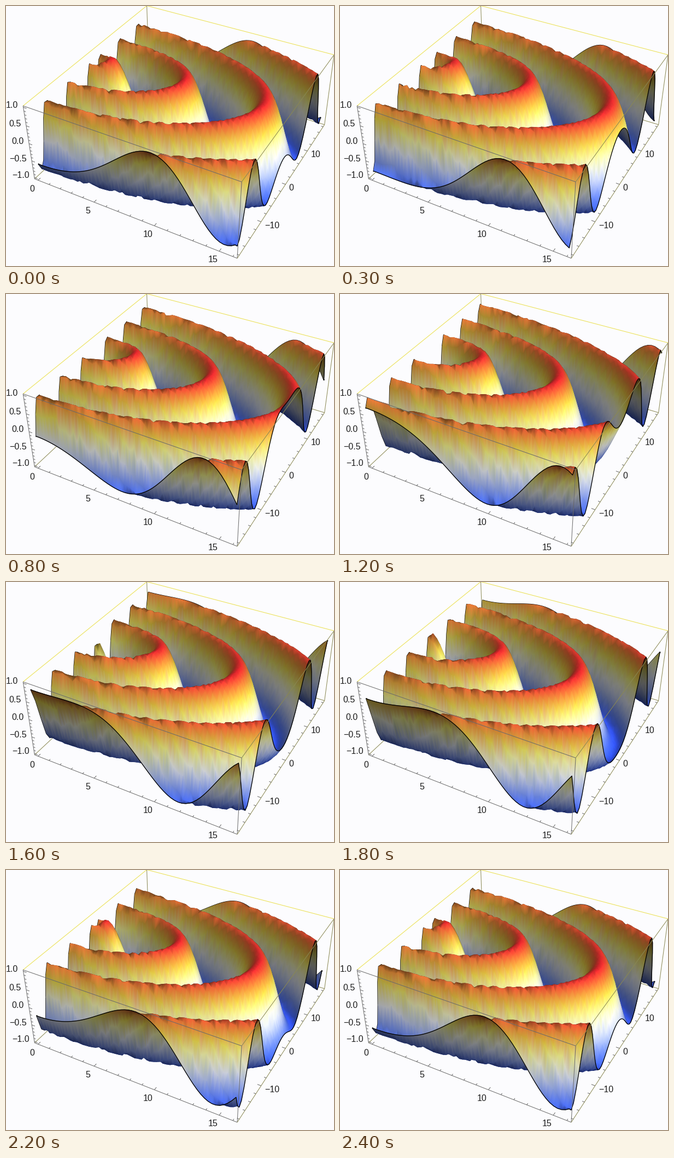
Animation, 600 px wide and 475 px high, one loop 2500 ms. Source, as a matplotlib script:

```python
import numpy as np
import matplotlib.pyplot as plt
from matplotlib.animation import FuncAnimation
from matplotlib.collections import LineCollection, TriMesh
from matplotlib.tri import Triangulation

W, H, DPI = 600, 475, 100
STEPS = 24                       # frames per wave period
XMAX, YMAX = 16, 18
PAD = 0.02                       # margin between data and box, each side
SCALE = np.array([1 / XMAX, 0.5 / YMAX, 0.2]) / (1 + 2 * PAD)

# Camera: looks at the box centre, box ratios 1 : 1 : 0.4
CAM = np.array([1.3, -2.4, 2.0])
FWD = -CAM / np.linalg.norm(CAM)
RIGHT = np.cross(FWD, [0, 0, 1])
RIGHT /= np.linalg.norm(RIGHT)
UP = np.cross(RIGHT, FWD)
ZOOM, CX, CY = 1367, 329.8, 201

LIGHTS = np.array([[1.5, -0.5, 1.5], [1.5, 1.5, 2.5], [-0.5, 1.5, 1.5]])
LIGHTS /= np.linalg.norm(LIGHTS, axis=1, keepdims=True)
LIGHTS = LIGHTS @ np.array([RIGHT, UP, -FWD])
AMBIENT, DIFFUSE = 0.33, 0.37

TEMPERATURE = np.array([
    [.179, .305, .934], [.309, .442, .941], [.453, .567, .950],
    [.642, .720, .965], [.820, .859, .977], [.936, .952, .994],
    [.984, .988, .912], [.995, .992, .728], [.993, .986, .481],
    [.956, .863, .283], [.904, .658, .242], [.858, .450, .204],
    [.817, .134, .164]])

PAPER, GREY, OLIVE, YELLOW = "#fcfcfe", "#6a6a6a", "#8a8852", "#ebe04c"


def to_box(x, y, z):
    pts = np.stack(np.broadcast_arrays(x, y, z), axis=-1) * SCALE
    return pts - [0.5 / (1 + 2 * PAD), 0, 0]


def project(p):
    d = np.asarray(p, float) - CAM
    k = ZOOM / (d @ FWD)
    return np.stack([CX + k * (d @ RIGHT), CY - k * (d @ UP)], axis=-1)


def px(width):
    return width * 72 / DPI


# Slightly irregular sampling mesh
NX, NY = 57, 52
rng = np.random.default_rng(4)
gx, gy = np.meshgrid(np.linspace(0, XMAX, NX), np.linspace(-YMAX, YMAX, NY),
                     indexing="ij")
shift = rng.uniform(-0.23, 0.23, (2, NX - 2, NY - 2))
gx[1:-1, 1:-1] += shift[0] * XMAX / (NX - 1)
gy[1:-1, 1:-1] += shift[1] * 2 * YMAX / (NY - 1)
radius = np.hypot(gx, gy)
swing = 1 - 0.16 * (gy / radius) ** 2     # weaker towards the sides

ids = np.arange(NX * NY).reshape(NX, NY)
a, b, c, d = (q.ravel() for q in
              (ids[:-1, :-1], ids[1:, :-1], ids[1:, 1:], ids[:-1, 1:]))
tris = np.concatenate([np.stack([a, b, d], 1), np.stack([b, c, d], 1)])
ground = to_box(gx, gy, 0).reshape(-1, 3)[:, :2]
dist = np.linalg.norm(ground[tris].mean(axis=1) - CAM[:2], axis=1)
tris = tris[np.argsort(-dist)]   # far triangles first


def shade(normal):
    return AMBIENT + DIFFUSE * np.clip(normal @ LIGHTS.T, 0, None).sum(-1)


def surface(phase):
    """Screen points of the mesh, and corner colours of every triangle."""
    z = swing * np.sin(radius - phase)
    xy = project(to_box(gx, gy, z))
    slope = swing * np.cos(radius - phase) / radius
    n = np.stack([-slope * gx * SCALE[2] / SCALE[0],
                  -slope * gy * SCALE[2] / SCALE[1],
                  np.ones_like(z)], axis=-1)
    n /= np.linalg.norm(n, axis=-1, keepdims=True)

    p, q, r = np.moveaxis(xy.reshape(-1, 2)[tris], 1, 0)
    u, v = q - p, r - p
    from_above = u[:, 0] * v[:, 1] - u[:, 1] * v[:, 0] < 0
    light = np.where(from_above[:, None], shade(n).ravel()[tris],
                     shade(-n).ravel()[tris])
    stops = np.linspace(-1, 1, len(TEMPERATURE))
    rgb = np.stack([np.interp(z, stops, ch) for ch in TEMPERATURE.T], axis=-1)
    rgb = rgb.reshape(-1, 3)[tris] * light[..., None]
    return xy, np.clip(rgb, 0, 1).reshape(-1, 3)


fig = plt.figure(figsize=(W / DPI, H / DPI), dpi=DPI, facecolor=PAPER)
ax = fig.add_axes([0, 0, 1, 1])
ax.set_xlim(0, W)
ax.set_ylim(H, 0)
ax.axis("off")


def segments(pairs, color, width, z):
    ax.add_collection(LineCollection([project(p) for p in pairs], colors=color,
                                     linewidths=px(width), zorder=z),
                      autolim=False)


def corner(name):
    return [0.5 if name[1] == "R" else -0.5,
            0.5 if name[0] == "B" else -0.5,
            0.2 if name[2] == "t" else -0.2]


def box_edges(names, color, z):
    pairs = [[corner(n) for n in pair.split("-")] for pair in names.split()]
    segments(pairs, color, 1, z)


box_edges("FLt-BLt BLt-BRt", YELLOW, 0)
box_edges("BLt-BLb FLb-BLb BLb-BRb", OLIVE, 0)
box_edges("FLt-FRt FRt-FRb FLt-FLb FLb-FRb", GREY, 5)
box_edges("FRt-BRt BRt-BRb FRb-BRb", OLIVE, 5)


def ticks(values, major, place, inward, fmt, offset, ha):
    """Ticks pointing into the box, numbers on the outside."""
    for v in values:
        p = np.array(place(v))
        big = abs(v / major - round(v / major)) < 1e-6
        size = 0.017 if big else 0.01
        segments([[p, p + size * np.array(inward)]], GREY, 1, 5)
        if big:
            x, y = project(p) + offset
            ax.text(x, y + 5.7, fmt.format(v + 0.0).replace("-", "\u2212"),
                    ha=ha, va="baseline", fontsize=px(16), color="#1c1c1c",
                    family="Liberation Sans", zorder=6)


ticks(np.arange(0, XMAX + 1), 5,
      lambda v: [to_box(v, 0, 0)[0], -0.5, -0.2],
      (0, 1, 0), "{:.0f}", (-11.3, 14.7), "center")
ticks(np.arange(-YMAX, YMAX + 1, 2), 10,
      lambda v: [0.5, to_box(0, v, 0)[1], -0.2],
      (-1, 0, 0), "{:.0f}", (6.3, 6), "left")
ticks(np.arange(-10, 11) / 10, 0.5,
      lambda v: [-0.5, -0.5, to_box(0, 0, v)[2]],
      (1, 0, 0), "{:.1f}", (-9.5, -5), "right")

# Every triangle owns its three corners, so both sides can be lit
start, shades = surface(0)
tri = Triangulation(*start.reshape(-1, 2)[tris.ravel()].T,
                    np.arange(tris.size).reshape(-1, 3))
mesh = TriMesh(tri, zorder=2)
mesh.set_facecolor(shades)
ax.add_collection(mesh, autolim=False)


def outline(width, z):
    return ax.plot([], [], color="black", lw=px(width), zorder=z,
                   solid_joinstyle="round")[0]


back, front = outline(2.3, 1), outline(1.3, 3)


def draw(i):
    xy, rgb = surface(2 * np.pi * i / STEPS)
    tri.x, tri.y = xy.reshape(-1, 2)[tris.ravel()].T
    mesh.set_facecolor(rgb)
    back.set_data(*np.concatenate([xy[0], xy[:, -1]]).T)
    front.set_data(*np.concatenate([xy[:, 0], xy[-1]]).T)
    return mesh, back, front


anim = FuncAnimation(fig, draw, frames=STEPS + 1, interval=100, repeat=True,
                     repeat_delay=0, blit=False)
plt.show()
```
